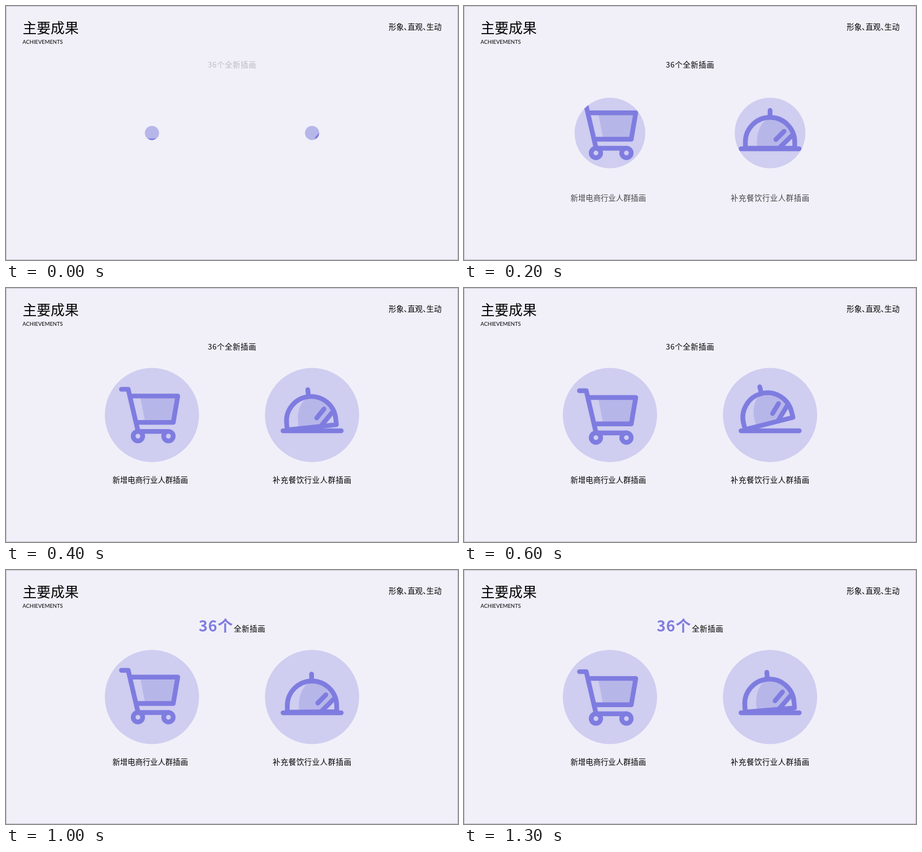
These frames come from a looping animation (800x450 px, 1.4 s). An HTML page with a canvas:

```html
<!DOCTYPE html>
<html lang="zh-CN">
<head>
<meta charset="utf-8">
<title>主要成果</title>
<style>
  html, body { margin: 0; width: 100%; height: 100%; overflow: hidden; background: #f1f0f9; }
  canvas { display: block; }
</style>
</head>
<body>
<canvas id="stage" width="800" height="450"></canvas>
<script>
const ctx = document.getElementById('stage').getContext('2d');
const LOOP = 1400, STEP = 100, FULL = 83.4;
const INK = '#7f7ce0', SHADE = '#b7b6e9', DISC = '#cfcdf0';
const CJK = '"Noto Sans CJK SC", "Noto Sans CJK", sans-serif';

// [time, amount] pairs for the two idle motions
const BOB = [[0, .65], [130, .1], [200, 0], [400, .45], [600, 1], [700, 1], [900, .52], [1000, .1], [1080, 0], [1300, .6]];
const SWING = [[0, .17], [100, .03], [200, 0], [400, .43], [600, 1], [700, 1], [900, .54], [1000, .05], [1130, 0], [1300, .33]];

const clamp = v => Math.min(1, Math.max(0, v));

function along(keys, t) {
  const i = keys.findIndex(k => k[0] >= t);
  if (i < 0) return keys[keys.length - 1][1];
  if (i === 0) return keys[0][1];
  const [t0, a] = keys[i - 1], [t1, b] = keys[i];
  return a + (b - a) * (t - t0) / (t1 - t0);
}

function text(str, x, y, size, { weight = 400, gap = 0, color = '#000', alpha = 1, family = CJK } = {}) {
  ctx.globalAlpha = alpha;
  ctx.font = `${weight} ${size}px ${family}`;
  ctx.letterSpacing = gap + 'px';
  ctx.fillStyle = color;
  ctx.fillText(str, x, y);
  ctx.globalAlpha = 1;
}

function poly(points, closed) {
  ctx.beginPath();
  points.forEach(([x, y]) => ctx.lineTo(x, y));
  if (closed) ctx.closePath();
}

function line(...points) {
  poly(points);
  ctx.stroke();
}

function disc(x, r, icon) {
  ctx.save();
  ctx.beginPath();
  ctx.arc(x, 225, r, 0, Math.PI * 2);
  ctx.fillStyle = DISC;
  ctx.fill();
  ctx.clip();
  ctx.strokeStyle = INK;
  ctx.fillStyle = SHADE;
  ctx.lineWidth = 8.4;
  ctx.lineCap = ctx.lineJoin = 'round';
  icon();
  ctx.restore();
}

function cart(dy) {
  ctx.translate(0, dy);
  poly([[237.5, 190], [304, 190], [296, 236], [246.5, 236]], true);
  ctx.fill();
  line([204.3, 177.3], [216.3, 177.3], [233.8, 252]);
  line([220, 189.3], [304, 189.3], [296, 236], [231, 236]);
  line([233.5, 252], [287.5, 252]);
  for (const x of [233.5, 287.5]) {
    ctx.beginPath();
    ctx.arc(x, 260.4, 8.4, 0, Math.PI * 2);
    ctx.fillStyle = DISC;
    ctx.fill();
    ctx.stroke();
  }
}

function cloche(angle) {
  ctx.save();
  ctx.translate(493, 253);
  ctx.rotate(-angle * Math.PI / 180);
  ctx.translate(-493, -253);
  ctx.beginPath();
  ctx.moveTo(518.5, 252);
  ctx.lineTo(518.5, 241);
  ctx.bezierCurveTo(518.5, 220, 528, 203, 541.7, 197.3);
  ctx.arc(541.7, 241, 43.7, -Math.PI / 2, -.33);
  ctx.lineTo(558, 252);
  ctx.fill();
  ctx.beginPath();
  ctx.moveTo(498, 252);
  ctx.arc(541.7, 241, 43.7, Math.PI, 0);
  ctx.lineTo(585.4, 252);
  ctx.closePath();
  ctx.stroke();
  line([541.7, 197], [541.7, 185]);
  line([552, 236.5], [566.5, 222]);
  line([558.5, 251], [582, 228]);
  ctx.restore();
  line([490.3, 253], [593.3, 253]);
}

function heading(t) {
  text('主要成果', 29.5, 48.3, 24.8);
  text('ACHIEVEMENTS', 29.3, 67, 9.4, { family: 'Lato, sans-serif' });
  ['形象、', '直观、', '生动'].forEach((s, i) => text(s, 677.3 + i * 33.4, 42.3, 13.4, { weight: 500 }));
  if (t < 1000) {
    text('36个全新插画', 357.3, 109, 13.4, { gap: .6, alpha: clamp(.22 + t / 250) });
  } else {
    text('36个', 341, 109.3, 27, { weight: 700, gap: .8, color: INK });
    text('全新插画', 403.3, 109, 13.4, { gap: .6 });
  }
}

function draw(t) {
  ctx.fillStyle = '#f1f0f9';
  ctx.fillRect(0, 0, 800, 450);
  ctx.lineWidth = 1;
  ctx.strokeStyle = '#bfbec6';
  ctx.strokeRect(.5, .5, 799, 449);
  heading(t);
  const r = FULL * clamp(.15 + .003 * t);
  disc(258.3, r, () => cart(4.7 * along(BOB, t)));
  disc(541.7, r, () => cloche(14.3 * along(SWING, t)));
  const alpha = clamp(t / 280);
  text('新增电商行业人群插画', 188.6, 345, 13.35, { alpha });
  text('补充餐饮行业人群插画', 472, 345, 13.4, { gap: .57, alpha });
}

function tick() {
  const t = performance.now() % LOOP;
  draw(Math.floor(t / STEP) * STEP);
  requestAnimationFrame(tick);
}
tick();
</script>
</body>
</html>
```
